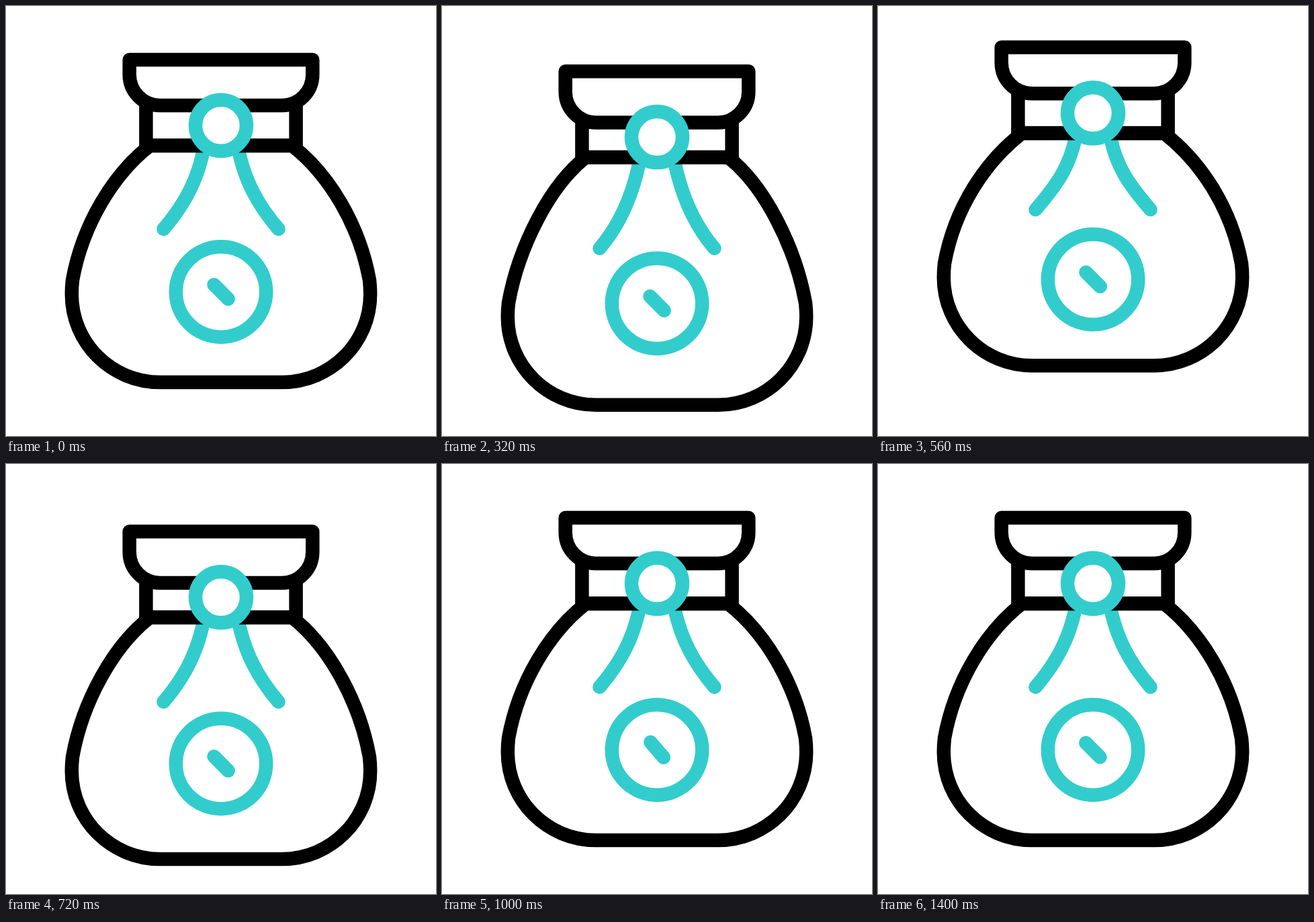
An HTML page for the animation above (1480 ms loop, 640 by 640 pixels).

```html
<!DOCTYPE html>
<html lang="en">
<head>
<meta charset="utf-8">
<title>Money bag</title>
<style>
  html, body { margin: 0; width: 100%; height: 100%; overflow: hidden; background: #fff; }
  svg { display: block; width: 100vw; height: 100vh; }
  .ink, .teal { fill: none; stroke: #000; stroke-width: 20.5; stroke-linejoin: round; }
  .teal { stroke: #3cc; stroke-linecap: round; }
</style>
</head>
<body>
<svg viewBox="0 0 640 640">
  <g id="bag">
    <path id="strings" class="teal"/>
    <path id="body" class="ink"/>
    <path id="neck" class="ink"/>
    <path id="collar" class="ink"/>
    <circle class="teal" cx="320" cy="177.8" r="38" style="fill:#fff"/>
    <g id="coin">
      <circle class="teal" cx="320" cy="425.5" r="67.2"/>
      <path class="teal" d="M309.5 414.8L330.7 436"/>
    </g>
  </g>
</svg>
<script>
const LOOP = 1480, STEP = 40;
const KEYS = [80, 280, 520, 720, 960];
const SPIN = [960, 1400];

// Offsets at each key time
const LIFT = [0, 20.5, -23, 20.5, 0];
const BELLY = [0, 18.5, -8, 7.5, 0];
const TAIL = [0, 13.4, -11.8, 1.5, 0];
const BRIM = [0, 8.8, -0.2, 8.5, 0];

const el = id => document.getElementById(id);
const ease = s => s * s * (3 - 2 * s);

function tween(times, values, t) {
  if (t <= times[0]) return values[0];
  for (let i = 1; i < times.length; i++) {
    if (t < times[i]) {
      const s = (t - times[i - 1]) / (times[i] - times[i - 1]);
      return values[i - 1] + (values[i] - values[i - 1]) * ease(s);
    }
  }
  return values[values.length - 1];
}

const bodyPath = d => `M214 208
  C160 250 114 ${325 + d} 99 ${408 + d}
  C98.2 ${415 + d} 97.8 ${422 + d} 97.8 ${429 + d}
  C97.8 ${501.3 + d} 156.6 ${560 + d} 229 ${560 + d}
  H411
  C483.4 ${560 + d} 542.2 ${501.3 + d} 542.2 ${429 + d}
  C542.2 ${422 + d} 541.8 ${415 + d} 541 ${408 + d}
  C526 ${325 + d} 480 250 426 208 Z`;

const collarPath = d => `M183.7 80 V${102 + d}
  C183.7 ${127.4 + d} 204 ${148 + d} 229 ${148 + d}
  H411
  C436 ${148 + d} 456.3 ${127.4 + d} 456.3 ${102 + d}
  V80 Z`;

const neckPath = d => `M208.4 ${146 + d} V207.6 H431.6 V${146 + d}`;

const stringsPath = d => `M294 214
  C285 258 267 ${294 + d} 234.5 ${332 + d}
  M346 214
  C355 258 373 ${294 + d} 405.5 ${332 + d}`;

function draw(t) {
  const brim = tween(KEYS, BRIM, t);
  el('bag').setAttribute('transform', `translate(0 ${tween(KEYS, LIFT, t)})`);
  el('body').setAttribute('d', bodyPath(tween(KEYS, BELLY, t)));
  el('strings').setAttribute('d', stringsPath(tween(KEYS, TAIL, t)));
  el('collar').setAttribute('d', collarPath(brim));
  el('neck').setAttribute('d', neckPath(brim));
  el('coin').setAttribute('transform', `rotate(${tween(SPIN, [0, 180], t)} 320 425.5)`);
}

const start = performance.now();
function tick() {
  const t = (performance.now() - start) % LOOP;
  draw(Math.floor(t / STEP) * STEP);
  requestAnimationFrame(tick);
}
tick();
</script>
</body>
</html>
```
